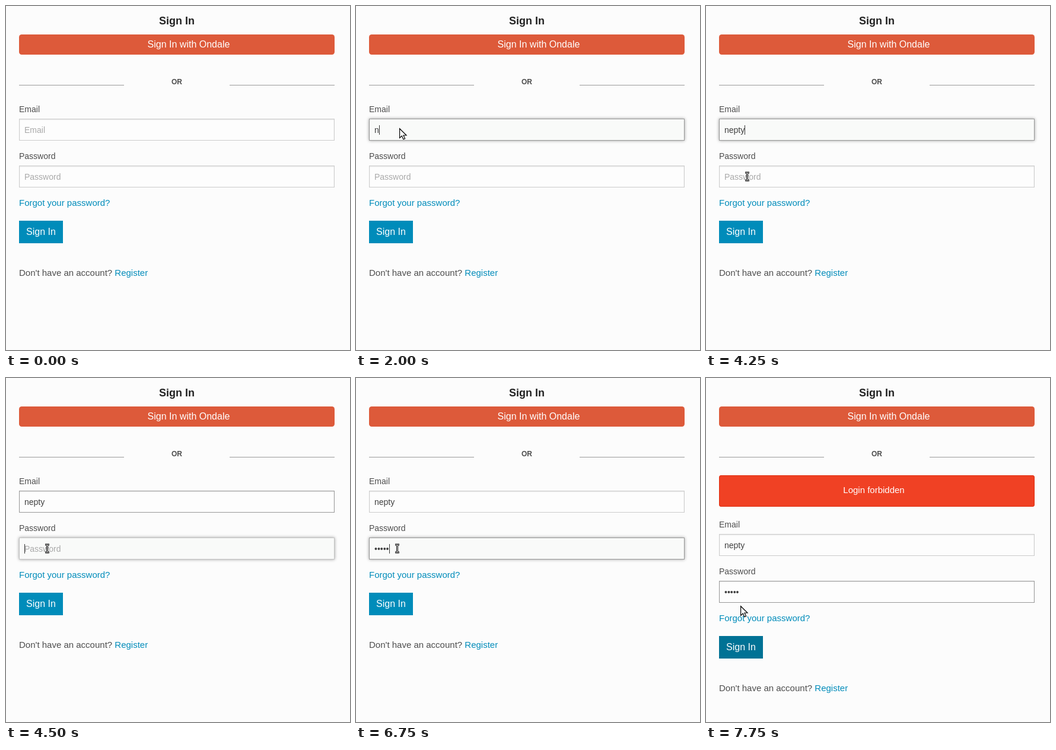
These frames come from a looping animation (580x580 px, 8 s). An HTML page:

```html
<!DOCTYPE html>
<html lang="en">
<head>
<meta charset="utf-8">
<title>Sign In</title>
<style>
  html, body { margin: 0; width: 100%; height: 100%; overflow: hidden; background: #fcfcfc; }
  .field {
    position: absolute; left: 22px; width: 532px; height: 37px; box-sizing: border-box;
    border: 1px solid #ccc; background: #fdfdfd;
    box-shadow: inset 0 1px 2px rgba(0, 0, 0, .1);
  }
  .field.focus { background: #f9faf9; box-shadow: 0 0 5px #999; }
  svg { position: absolute; left: 0; top: 0; }
  text { font-family: "Liberation Sans", Arial, sans-serif; font-size: 15px; fill: #4d4d4d; white-space: pre; }
  .big { font-size: 16px; fill: #fff; }
  .small { font-size: 14px; }
  .link { fill: #008cba; }
  .white { fill: #fff; }
</style>
</head>
<body>
<div class="field" id="emailBox"></div>
<div class="field" id="passBox"></div>
<svg width="580" height="580" viewBox="0 0 580 580">
  <text x="258" y="31" style="font-size:18px;font-weight:bold;fill:#222">Sign In</text>
  <rect x="22" y="48" width="532" height="34" rx="4.5" fill="#dd5a3a"/>
  <text class="big" x="238.6" y="70">Sign In with Ondale</text>
  <path d="M22 133.5H199M377 133.5H554" stroke="#999"/>
  <text x="279" y="132" style="font-size:12px;font-weight:bold">OR</text>
  <g id="alert">
    <rect x="22.5" y="164.5" width="531" height="52" rx="2.5" fill="#f04124" stroke="#de2d0f"/>
    <text class="white" x="231.3" y="194">Login forbidden</text>
  </g>
  <g id="form">
    <text class="small" x="22" y="179">Email</text>
    <text class="small" id="email" x="31" y="214"></text>
    <text class="small" x="22" y="258">Password</text>
    <text class="small" id="pass" x="31" y="293"></text>
    <text class="link" id="forgot" x="22" y="337">Forgot your password?</text>
    <rect id="button" x="22" y="362" width="74" height="38"/>
    <text class="big" x="34" y="386">Sign In</text>
    <text x="22" y="455">Don't have an account? <tspan class="link">Register</tspan></text>
    <rect id="caret" width="1" height="16" fill="#333"/>
  </g>
  <g id="arrow" fill="#fff" stroke="#000" stroke-width="1.2">
    <path d="M.6 .8V16.4L4.3 13L6.9 18.8L9.6 17.6L7 12H12Z"/>
  </g>
  <g id="beam" fill="none">
    <path d="M-3.5 -6.5H-1L0 -5.5L1 -6.5H3.5M-3.5 6.5H-1L0 5.5L1 6.5H3.5M0 -6V6" stroke="#000" stroke-width="3"/>
    <path d="M-3 -6.5H-1L0 -5.5L1 -6.5H3M-3 6.5H-1L0 5.5L1 6.5H3M0 -6V6" stroke="#fff"/>
  </g>
  <g id="hand" fill="#fff" stroke="#000" stroke-width="1.1" stroke-linejoin="round">
    <path d="M3.5 10V1.8Q3.5 .6 4.8 .6T6.1 1.8V6Q8.5 4.6 9 6.5Q11.5 5.2 12 7.2Q14.5 6.4 14.5 8.6V11.5L13 14V16.5H5.5V14.5L.8 9.6Q.3 7.6 2 8Z"/>
    <path d="M6.5 10.5V13M9 10.5V13M11.5 10.5V13" stroke="#666" stroke-width=".8"/>
  </g>
</svg>
<script>
const LOOP = 8000, STEP = 250, USER = "nepty";
const $ = id => document.getElementById(id);

// Each list holds [start ms, value...]; a value lasts until the next entry.
const pointer = [
  [0, ""], [500, "arrow", 185, 157], [750, "arrow", 54, 152], [1000, "beam", 71.5, 198.5],
  [1250, "beam", 73.5, 206.5], [1500, "arrow", 73, 206], [3750, "beam", 69.5, 222.5],
  [4000, "beam", 68.5, 277.5], [4250, "beam", 69.5, 287.5],
  [7250, "hand", 55, 331], [7500, "hand", 55, 383], [7750, "arrow", 58, 384]
];
const emailKeys = [[0, 0], [2000, 1], [2250, 2], [2500, 3], [3000, 4], [3250, 5]];
const passKeys = [[0, 0], [6000, 1], [6250, 2], [6500, 3], [6750, 5]];
const emailEdge = [[0, "#ccc"], [1500, "#999"], [4750, "#b3b3b3"], [5000, "#ccc"]];
const passEdge = [[0, "#ccc"], [4500, "#c4c4c4"], [4750, "#aaa"], [5000, "#999"]];
const caretOn = [[0, 0], [1250, 1], [3750, 0], [4250, 1], [5750, 0], [6000, 1], [7250, 0]];
const buttonFill = [[0, "#008cba"], [7500, "#007ba4"], [7750, "#007295"]];
const emailCarets = [31, 39, 47, 54, 58, 65];

const at = (list, t) => list.findLast(k => k[0] <= t).slice(1);
const show = (el, on) => el.style.display = on ? "" : "none";

function fill(el, value, hint) {
  el.textContent = value || hint;
  el.style.fill = value ? "#404040" : "#a9a9a9";
}

function box(el, top, edge, focus) {
  el.style.top = top + "px";
  el.style.borderColor = edge;
  el.classList.toggle("focus", focus);
}

function draw(t) {
  const failed = t >= 7750, shift = failed ? 73 : 0;
  const onEmail = t >= 1250 && t < 4500, onPass = t >= 4500 && !failed;
  const [typed] = at(emailKeys, t), [dots] = at(passKeys, t);

  show($("alert"), failed);
  $("form").setAttribute("transform", `translate(0 ${shift})`);
  box($("emailBox"), 190 + shift, at(emailEdge, t)[0], onEmail);
  box($("passBox"), 269 + shift, at(passEdge, t)[0], onPass);
  fill($("email"), USER.slice(0, typed), "Email");
  fill($("pass"), "\u2022".repeat(dots), "Password");
  $("forgot").style.fill = t >= 7250 && t < 7500 ? "#0078a0" : "";
  $("button").setAttribute("fill", at(buttonFill, t)[0]);

  const caret = $("caret");
  show(caret, at(caretOn, t)[0]);
  caret.setAttribute("x", onEmail ? emailCarets[typed] : Math.round(31 + dots * 4.91));
  caret.setAttribute("y", onEmail ? 201 : 280);

  const [kind, x, y] = at(pointer, t);
  for (const id of ["arrow", "beam", "hand"]) show($(id), id === kind);
  if (kind) $(kind).setAttribute("transform", `translate(${x} ${y})`);
}

const begin = performance.now();
let last = -1;
function tick() {
  const t = Math.floor((performance.now() - begin) % LOOP / STEP) * STEP;
  if (t !== last) draw(last = t);
  requestAnimationFrame(tick);
}
tick();
</script>
</body>
</html>
```
